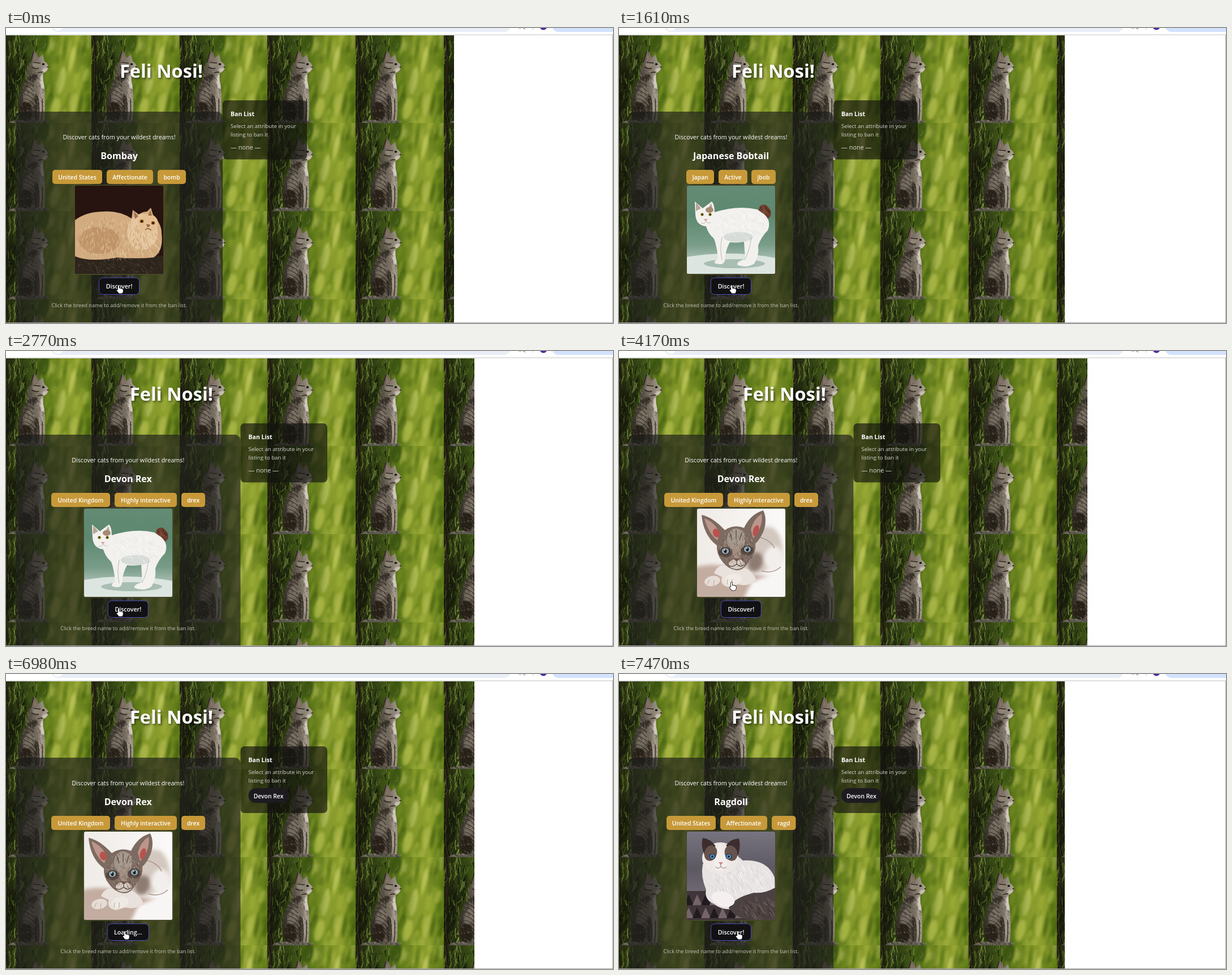
An HTML page with a canvas that plays this animation: 1073 by 522 pixels, repeating every 8000 ms.

```html
<!DOCTYPE html>
<html lang="en">
<head>
<meta charset="utf-8">
<title>Cat discovery</title>
<style>
html, body { margin: 0; width: 100%; height: 100%; overflow: hidden; background: #fff; }
canvas { display: block; }
</style>
</head>
<body>
<canvas id="stage" width="1073" height="522"></canvas>
<script>
const ctx = document.getElementById('stage').getContext('2d');
const LOOP = 8000, TILE = 155.7, TOP = 12.5, LEFT = 17;

// Each scene: start, right edges of the two panels, breed, tags as [label, left, width]
const scenes = [
  { at: 0, cardEnd: 383, banEnd: 532, breed: 'Bombay',
    tags: [['United States', 82, 88], ['Affectionate', 178, 82], ['bomb', 268, 50]] },
  { at: 1490, cardEnd: 379, banEnd: 528, breed: 'Japanese Bobtail',
    tags: [['Japan', 119, 49], ['Active', 176, 51], ['jbob', 234, 43]] },
  { at: 2770, cardEnd: 414.5, banEnd: 568, breed: 'Devon Rex',
    tags: [['United Kingdom', 80, 104], ['Highly interactive', 192, 110], ['drex', 310, 42]] },
  { at: 7100, cardEnd: 379, banEnd: 528, breed: 'Ragdoll',
    tags: [['United States', 84, 87], ['Affectionate', 179, 83], ['ragd', 270, 42.5]] }
];
const photoTimes = [
  { at: 0, draw: drawPersian }, { at: 530, draw: drawBombay }, { at: 1610, draw: drawBobtail },
  { at: 3020, draw: drawDevon }, { at: 7470, draw: drawRagdoll }
];
const cursorStops = [
  [0, 200, 455], [4170, 200, 409], [4320, 201, 362], [4440, 202, 318], [4560, 203, 288],
  [4680, 203, 266], [4800, 203, 250], [4930, 203, 234], [5050, 203, 226], [6230, 205, 250],
  [6350, 207, 320], [6470, 209, 400], [6590, 210, 445], [6740, 211, 455]
].map(([at, x, y]) => ({ at, x, y }));
const loadingSpans = [[1220, 1490], [2620, 2770], [6860, 7100]];

const latest = (list, t) => list.findLast(item => item.at <= t);

function random(seed) {
  return () => (seed = (seed * 16807) % 2147483647) / 2147483647;
}

function fillPath(g, color, d) {
  g.fillStyle = color;
  g.fill(new Path2D(d));
}

function strokePath(g, color, width, d) {
  g.strokeStyle = color;
  g.lineWidth = width;
  g.stroke(new Path2D(d));
}

function oval(g, color, x, y, rx, ry = rx, angle = 0) {
  g.fillStyle = color;
  g.beginPath();
  g.ellipse(x, y, rx, ry, angle, 0, Math.PI * 2);
  g.fill();
}

function box(g, color, x, y, w, h, radius = 0) {
  g.fillStyle = color;
  g.beginPath();
  g.roundRect(x, y, w, h, radius);
  g.fill();
}

function gradient(g, x0, y0, x1, y1, ...colors) {
  const fill = g.createLinearGradient(x0, y0, x1, y1);
  colors.forEach((c, i) => fill.addColorStop(i / (colors.length - 1), c));
  return fill;
}

function text(label, x, y, size, weight = 400, align = 'center', color = '#fff') {
  ctx.font = `${weight} ${size}px "Open Sans", "Noto Sans", sans-serif`;
  ctx.textAlign = align;
  ctx.fillStyle = color;
  ctx.fillText(label, x, y);
}

function makeCanvas(width, height, draw) {
  const canvas = document.createElement('canvas');
  canvas.width = width;
  canvas.height = height;
  draw(canvas.getContext('2d'));
  return canvas;
}

// Short hairs scattered over an oval patch
function fur(g, colors, count, x, y, rx, ry, length, lean) {
  const rnd = random(count * 31 + 7);
  g.save();
  g.lineWidth = 0.9;
  g.globalAlpha *= 0.6;
  for (let i = 0; i < count; i++) {
    const a = rnd() * Math.PI * 2, r = Math.sqrt(rnd());
    const px = x + Math.cos(a) * r * rx, py = y + Math.sin(a) * r * ry;
    g.strokeStyle = colors[i % colors.length];
    g.beginPath();
    g.moveTo(px, py);
    g.lineTo(px + lean * length + rnd() * 3, py + length * (0.5 + rnd() * 0.5));
    g.stroke();
  }
  g.restore();
}

function drawTile(g) {
  const rnd = random(41);
  box(g, gradient(g, 0, 0, 156, 0, '#26280f', '#2c3813', '#3d5216', '#587418', '#86992c', '#8d9f2e', '#5f7c18'),
    0, 0, 156, 156);
  g.filter = 'blur(2px)';
  const blurred = ['#c0c660', '#4a6712', '#a3b23e', '#6a8719', '#8ea12f', '#3f5a10'];
  for (let i = 0; i < 90; i++) {
    g.globalAlpha = 0.3 + rnd() * 0.35;
    oval(g, blurred[i % 6], 66 + rnd() * 92, rnd() * 156, 2 + rnd() * 3.5, 7 + rnd() * 17, 0.2);
  }
  g.globalAlpha = 0.65;
  oval(g, '#c3cb68', 103, 80, 6, 25, 0.2);
  oval(g, '#b6c050', 92, 130, 8, 20, 0.3);
  oval(g, '#bfc85c', 122, 40, 5, 22, 0.2);
  oval(g, '#b4bd52', 125, 122, 5, 20, 0.2);
  oval(g, '#324a0e', 72, 14, 9, 17, 0.2);
  oval(g, '#15160c', 12, 105, 12, 50, 0.1);
  oval(g, '#15160c', 33, 60, 6, 30, 0.2);
  g.filter = 'none';
  // Willow strands
  const leaves = ['#6d8a31', '#0e1109', '#3c5219', '#8fa34c', '#13180b'];
  for (let i = 0; i < 240; i++) {
    const x = rnd() * (30 + rnd() * 50), y = rnd() * 160 - 14;
    g.globalAlpha = 0.35 + rnd() * 0.5;
    strokePath(g, leaves[i % 5], 0.6 + rnd() * 1.3, `M${x} ${y}q${3 - rnd() * 6} 8 ${4 - rnd() * 12} ${9 + rnd() * 12}`);
  }
  g.globalAlpha = 0.6;
  strokePath(g, '#15120c', 5, 'M3 0Q9 45 4 80T8 156');
  strokePath(g, '#574832', 1, 'M2 0Q8 50 4 90T8 156');
  g.globalAlpha = 1;
  fillPath(g, '#5d594e', 'M8 156Q18 148 38 150L74 149L80 156Z');
  fur(g, ['#a19b8c', '#2c2a20'], 50, 44, 152, 34, 3, 3, 0.5);
  drawSittingCat(g);
}

function drawSittingCat(g) {
  const body = 'M55 26Q61 34 62 40L70 34L73 46Q80 51 80 56Q79 63 71 67Q69 77 73 91Q75 118 73 151H40Q24 148 27 118Q30 94 42 76Q41 60 48 47Z';
  fillPath(g, gradient(g, 27, 0, 78, 0, '#302c24', '#4f483e', '#7d7467', '#aaa092'), body);
  g.save();
  g.clip(new Path2D(body));
  g.filter = 'blur(1.2px)';
  oval(g, '#d2cabe', 70, 82, 5, 13);
  oval(g, '#c9c0b4', 75, 62, 6, 4);
  oval(g, '#a39a8c', 68, 118, 4, 24);
  oval(g, '#282219', 40, 135, 12, 17);
  oval(g, '#746b5f', 46, 104, 9, 15, 0.4);
  oval(g, '#322c24', 58, 128, 4, 24);
  oval(g, '#39322a', 53, 75, 9, 6, -0.3);
  oval(g, '#8d8476', 59, 52, 7, 6);
  g.filter = 'none';
  g.globalAlpha = 0.6;
  for (let i = 0; i < 10; i++) {
    const y = 74 + i * 7.5;
    strokePath(g, '#201b14', 1.6, `M${41 - i} ${y}q10 2 ${13 + i} 10`);
  }
  g.globalAlpha = 0.8;
  fur(g, ['#1f1a14', '#bcb2a5', '#575044'], 260, 51, 105, 26, 50, 4, 0.2);
  g.restore();
  fillPath(g, '#8b7168', 'M55 32L59 42L53 47Z');
  strokePath(g, '#2a241c', 1.5, 'M50 56Q57 60 63 58M54 48L66 49M61 66L70 65M48 48L54 28');
  oval(g, '#14120c', 71, 51, 2.4, 1.8);
  oval(g, '#3a2b25', 79, 56, 1.5, 1.3);
  strokePath(g, '#292219', 1.3, 'M61 108Q65 130 62 150M69 112Q70 132 68 150');
}

function drawPersian(g) {
  box(g, '#27130f', 0, 0, 156, 156);
  fillPath(g, '#2e251d', 'M0 124H156V156H0Z');
  fur(g, ['#50453a', '#17110d', '#6a5a48'], 220, 78, 141, 78, 15, 5, 0.5);
  fillPath(g, '#d2ac80', 'M0 61Q18 47 46 46Q77 43 100 58L102 43L113 51Q119 46 127 46L134 39L139 55Q153 67 153 84Q157 115 139 127Q105 130 75 127Q26 136 0 125Z');
  oval(g, '#e5c69e', 119, 82, 27, 32);
  oval(g, '#bf9468', 43, 97, 36, 24);
  fur(g, ['#f0d8b4', '#b5895f', '#dfbd92', '#c99f73'], 620, 65, 91, 62, 36, 7, -0.3);
  fur(g, ['#efd8b6', '#c39a6f'], 150, 126, 101, 24, 24, 7, 0.1);
  oval(g, '#e4bf93', 129, 67, 18, 17);
  fillPath(g, '#a36f50', 'M104 46L112 54L106 59ZM133 43L136 53L129 53Z');
  oval(g, '#94530e', 118, 63, 3.5, 3);
  oval(g, '#94530e', 138, 66, 3.3, 3);
  oval(g, '#1c120a', 118, 63, 1.7);
  oval(g, '#1c120a', 138, 66, 1.7);
  strokePath(g, '#805037', 1.4, 'M127 69L132 70L129 73ZM124 78Q129 73 135 79');
}

function drawBombay(g) {
  box(g, '#fdfdfd', 0, 0, 156, 156);
  oval(g, '#e7e5e5', 60, 151, 65, 4);
  const coat = gradient(g, 0, 8, 30, 145, '#15100f', '#29201f', '#100c0c');
  fillPath(g, coat, 'M0 16Q22 5 48 12Q78 10 104 25L108 3L124 18Q134 17 141 22L155 10Q157 27 154 46Q162 72 142 88Q132 98 121 98Q130 117 119 130Q109 142 103 133Q106 123 110 119L104 102Q108 123 122 147Q122 156 105 152Q95 151 99 143Q87 117 86 95Q60 87 48 92Q37 99 40 111Q58 124 62 141Q62 153 43 149L37 142L45 139Q27 122 22 108L13 118Q17 137 29 146Q32 156 15 154Q3 143 0 125Z');
  oval(g, '#241c1b', 128, 42, 25, 27);
  fillPath(g, '#403230', 'M111 10L119 20L111 24ZM150 17L149 29L143 23Z');
  strokePath(g, '#3c302e', 2, 'M38 34Q27 58 45 81M74 28Q95 49 90 80M120 75Q135 82 145 72');
  for (const [x, y] of [[112, 37], [135, 42]]) {
    oval(g, '#ddb31c', x, y, 5, 4.4, 0.2);
    oval(g, '#0b0808', x, y, 1.7, 3.2);
  }
  fillPath(g, '#4b3d3b', 'M117 52L126 53L121 58Z');
  strokePath(g, '#574743', 0.8, 'M116 62L103 66M128 61L144 66');
}

function drawBobtail(g) {
  box(g, gradient(g, 0, 0, 0, 156, '#648b75', '#5d886f', '#789c88', '#d6dfdb'), 0, 0, 156, 156);
  fillPath(g, '#dce5e0', 'M0 126Q80 113 156 128V156H0Z');
  oval(g, '#a9beb3', 84, 138, 54, 8);
  oval(g, '#6f3c2b', 138, 46, 10, 13, -0.5);
  fur(g, ['#34231f', '#a06b4f'], 35, 136, 42, 8, 9, 8, 0.3);
  fillPath(g, '#f2f1ee', 'M14 28L28 40L44 28Q49 33 49 47Q90 34 124 42L136 50Q150 62 143 79Q131 91 126 106Q128 124 119 138Q105 147 89 140Q88 134 103 130L101 99Q91 102 76 100Q68 114 67 132Q65 143 49 137Q49 132 55 129Q53 107 48 94Q37 84 34 72Q16 70 15 51Z');
  oval(g, '#d7dcd8', 91, 91, 26, 9);
  fur(g, ['#ffffff', '#d6d9d6'], 130, 91, 68, 43, 24, 6, 0.5);
  fillPath(g, '#b7a395', 'M16 30L25 40L16 45ZM43 31L46 43L37 41Z');
  oval(g, '#a68a73', 40, 43, 7, 5);
  for (const x of [27, 41]) {
    oval(g, '#b29a41', x, 51, 3, 2.8);
    oval(g, '#242518', x, 51, 1.4, 2);
  }
  fillPath(g, '#d39d91', 'M30 59H37L33 63Z');
  strokePath(g, '#b9b9b4', 1, 'M34 63Q30 69 25 66M34 63Q39 68 42 65M62 91Q58 112 62 132M114 92Q110 119 102 131');
}

function drawDevon(g) {
  box(g, gradient(g, 0, 0, 156, 0, '#efebe6', '#f5f2ef', '#fbfaf9'), 0, 0, 156, 156);
  g.filter = 'blur(3px)';
  fillPath(g, '#c3aca0', 'M-5 104Q40 92 80 112L135 122L100 160H-5Z');
  fillPath(g, '#d3c8c0', 'M88 48Q112 26 135 34Q156 52 150 92L112 114H80Z');
  oval(g, '#8d7b71', 103, 94, 13, 17, 0.3);
  oval(g, '#f2eeeb', 136, 88, 17, 22);
  fillPath(g, '#f8f6f4', 'M96 130L160 104V160H82Z');
  g.filter = 'blur(.7px)';
  strokePath(g, '#a9958b', 1.5, 'M108 50Q130 55 137 70M114 110Q134 116 148 103');
  fillPath(g, '#e9e1db', 'M30 114Q38 94 62 103L88 106Q104 118 104 127Q90 139 73 134L56 139Q39 135 44 121Z');
  fillPath(g, '#7d6a60', 'M8 11Q28 15 49 38Q65 27 83 34Q94 10 117 3Q125 20 117 41Q110 56 103 62Q105 79 92 92Q83 110 69 109Q55 107 45 94Q34 81 35 65Q11 47 8 11Z');
  fillPath(g, '#bb958b', 'M13 17Q31 24 40 43L36 56Q20 44 13 17ZM95 37Q100 18 114 9Q117 25 106 45L99 52Z');
  oval(g, '#b8534d', 34, 43, 6, 8, -0.4);
  oval(g, '#b8534d', 104, 39, 5, 10, 0.3);
  oval(g, '#a4978c', 69, 55, 16, 20);
  oval(g, '#5b4a42', 50, 77, 12, 9);
  oval(g, '#5b4a42', 89, 74, 12, 9);
  oval(g, '#a39083', 70, 75, 7, 14);
  oval(g, '#d5cac1', 70, 98, 14, 9);
  g.filter = 'none';
  fur(g, ['#4d3f37', '#c3b6aa', '#94857a'], 190, 70, 68, 32, 33, 5, 0);
  for (const [x, y] of [[50, 75], [89, 72]]) {
    oval(g, '#352c29', x, y, 8, 6.5);
    oval(g, '#91a6b2', x, y, 6.4, 5.4);
    oval(g, '#16191d', x, y, 2.4, 3.4);
    oval(g, '#f3f4f5', x - 1, y - 2, 1.1);
  }
  fillPath(g, '#76524d', 'M64 88H76L70 94Z');
  strokePath(g, '#55453f', 1.2, 'M70 94V98Q62 105 56 100M70 98Q77 105 83 99M58 42L62 56M69 38V54M79 42L75 56');
  oval(g, '#f0eae5', 64, 125, 15, 10, -0.2);
  oval(g, '#e6dcd5', 27, 128, 14, 9, -0.2);
  strokePath(g, '#b6a097', 1, 'M22 126L18 134M30 127L29 136M54 125L53 134M62 125L62 135');
}

function drawRagdoll(g) {
  box(g, gradient(g, 0, 0, 0, 130, '#777480', '#5d5963', '#77717a'), 0, 0, 156, 156);
  box(g, '#40363a', 0, 105, 156, 51);
  for (let i = 0; i < 14; i++) {
    const x = (i % 7) * 15 - 5, y = 111 + Math.floor(i / 7) * 23;
    fillPath(g, i % 2 ? '#736569' : '#211b20', `M${x} ${y + 19}l8 -19l9 19Z`);
  }
  fillPath(g, '#e7e3e3', 'M28 58Q45 34 72 38Q87 39 99 51Q142 48 155 81L156 119Q120 141 82 137Q61 139 48 128Q30 120 34 103Q24 79 28 58Z');
  fur(g, ['#fff', '#c9c2c5', '#f5f1f0'], 300, 94, 88, 57, 34, 9, 0.2);
  fillPath(g, '#4d4242', 'M156 99Q137 110 119 108Q82 117 74 135Q85 152 111 156H156Z');
  fur(g, ['#83746f', '#302726', '#625451'], 180, 126, 132, 33, 20, 9, 0.4);
  oval(g, '#ede8e6', 59, 47, 32, 28);
  fillPath(g, '#3d2e2d', 'M28 11Q43 13 51 26L38 33L31 41Q24 24 28 11ZM92 12Q76 13 69 25L81 32L90 43Q96 26 92 12Z');
  oval(g, '#66534d', 42, 38, 11, 14, 0.3);
  oval(g, '#66534d', 78, 38, 11, 14, -0.3);
  fillPath(g, '#f3eeec', 'M59 20Q63 42 72 55Q66 72 57 70Q45 65 48 55Z');
  for (const x of [45, 74]) {
    oval(g, '#332729', x, 44, 5.5, 5);
    oval(g, '#4b96d5', x, 44, 4.3, 4);
    oval(g, '#10202e', x, 44, 2);
  }
  fillPath(g, '#c9868a', 'M56 54H64L60 59Z');
  strokePath(g, '#8f7778', 1, 'M60 58V62Q55 67 50 62M60 62Q65 67 70 62');
  oval(g, '#f5f0ef', 64, 119, 21, 13, 0.3);
}

function drawWallpaper(g) {
  const tile = makeCanvas(156, 156, drawTile);
  for (let row = 0; row < 4; row++) {
    for (let col = 0; col < 6; col++) {
      g.drawImage(tile, Math.round(col * TILE - 4.7), Math.round(TOP + row * TILE));
    }
  }
}

function drawBrowser() {
  box(ctx, '#fff', 0, 0, 1073, 12);
  box(ctx, '#e9eef6', 80, -20, 812, 27, 12);
  oval(ctx, '#fff', 92, -4, 9);
  box(ctx, '#d3e3fd', 965, -20, 130, 27, 12);
  oval(ctx, '#4c259f', 950, -3, 6.5);
  strokePath(ctx, '#66696e', 1, 'M872 0l2 -2M879 0l2 -2M906 0h5M914 0l4 2');
  box(ctx, '#c6c8cb', 931, 0, 1, 3);
  box(ctx, '#bfc1c0', 0, 11.5, 1073, 1);
  box(ctx, '#a5a5a5', 1072, 12, 1, 510);
  box(ctx, '#a5a5a5', 0, 521, 1073, 1);
}

function drawCursor({ x, y }, isText) {
  if (isText) {
    strokePath(ctx, '#e8e8e8', 1, `M${x - 2} ${y - 5}h4m-2 0v10m-2 0h4`);
    return;
  }
  const hand = new Path2D(`M${x - 2} ${y + 1}q1 -2 2 0v5q2 -1 2.4 .4q2 -.8 2.4 .6q2 -.4 2 1v3.5l-1.5 3h-5.6l-4 -5q0 -2 2.3 -.6Z`);
  ctx.fillStyle = '#fff';
  ctx.strokeStyle = '#111';
  ctx.lineWidth = 1.6;
  ctx.lineJoin = 'round';
  ctx.stroke(hand);
  ctx.fill(hand);
}

function drawTitle(x) {
  ctx.save();
  ctx.shadowColor = 'rgba(0,0,0,.6)';
  ctx.shadowOffsetX = ctx.shadowOffsetY = 2;
  ctx.shadowBlur = 4;
  text('Feli Nosi!', x, 88, 32.5, 700);
  ctx.restore();
}

function drawBanList(left, right, banned) {
  box(ctx, 'rgba(18,17,15,.66)', left, 128, right - left, banned ? 118 : 104.5, 7);
  const x = left + 14;
  text('Ban List', x, 155.5, 10.5, 700, 'left');
  text('Select an attribute in your', x, 176.5, 9.65, 400, 'left', '#d9d8d2');
  text('listing to ban it', x, 191.5, 9.65, 400, 'left', '#d9d8d2');
  if (banned) {
    box(ctx, '#1d1b20', x, 202, 71, 26, 13);
    text('Devon Rex', x + 35.5, 219.5, 10.4, 600);
  } else {
    text('— none —', x, 214.5, 10.9, 400, 'left', '#dddcd6');
  }
}

function drawPhoto(draw, x, y) {
  box(ctx, 'rgba(72,73,42,.9)', x - 2, y - 2, 160, 160, 5);
  ctx.save();
  ctx.translate(x, y);
  ctx.beginPath();
  ctx.roundRect(0, 0, 156, 156, 3);
  ctx.clip();
  draw(ctx);
  ctx.restore();
}

function drawButton(x, loading, hover) {
  const w = loading ? 73 : 71;
  box(ctx, '#111013', x - w / 2, 442, w, 29.5, 6.5);
  if (hover) {
    ctx.strokeStyle = '#4d51b5';
    ctx.lineWidth = 1;
    ctx.stroke();
  }
  text(loading ? 'Loading...' : 'Discover!', x, 461.3, 10.6, 600);
}

const wallpaper = makeCanvas(830, 522, drawWallpaper);

function render(t) {
  const { cardEnd, banEnd, breed, tags } = latest(scenes, t);
  const center = (LEFT + cardEnd) / 2;
  const cursor = latest(cursorStops, t);
  const pageWidth = Math.round(banEnd + 260.4);

  ctx.fillStyle = '#fff';
  ctx.fillRect(0, 0, 1073, 522);
  ctx.drawImage(wallpaper, 0, 0, pageWidth, 522, 0, 0, pageWidth, 522);
  drawBrowser();
  drawTitle((LEFT + banEnd) / 2);

  box(ctx, 'rgba(30,30,27,.67)', LEFT, 148, cardEnd - LEFT, 373, [10, 10, 0, 0]);
  drawBanList(cardEnd, banEnd, t >= 5170);
  text('Discover cats from your wildest dreams!', center, 197, 10.7);
  text(breed, center, 231.7, 16.1, 700);
  for (const [label, x, w] of tags) {
    const hover = cursor.y > 251 && cursor.y < 276 && cursor.x > x && cursor.x < x + w;
    box(ctx, hover ? '#b28430' : '#c79939', x, 251, w, 25, 5);
    text(label, x + w / 2, 268.3, 10.4, 600);
  }
  drawPhoto(latest(photoTimes, t).draw, Math.round(center) - 78, 279);
  drawButton(center, loadingSpans.some(([from, to]) => t >= from && t < to), t < 4320 || t >= 6740);
  text('Click the breed name to add/remove it from the ban list.', center, 493.5, 9.18, 400, 'center', '#c4c2b5');
  drawCursor(cursor, t >= 4930 && t < 6230);
}

function frame() {
  render(performance.now() % LOOP);
  requestAnimationFrame(frame);
}
frame();
</script>
</body>
</html>
```
